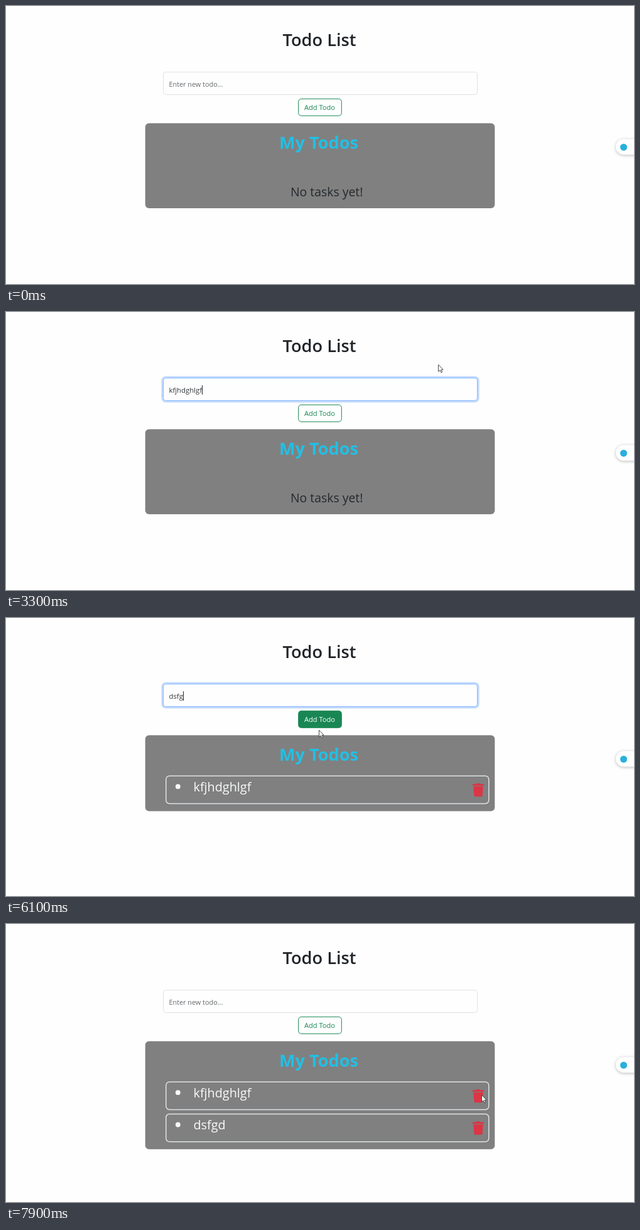
An HTML page with a canvas for the animation above (8 s loop, 1000x444 px).

```html
<!DOCTYPE html>
<html lang="en">
<head>
<meta charset="utf-8">
<title>Todo List</title>
<style>
  html, body { margin: 0; width: 100%; height: 100%; overflow: hidden; background: #fefefe; }
  canvas { display: block; }
</style>
</head>
<body>
<canvas id="stage" width="1000" height="444"></canvas>
<script>
const ctx = document.getElementById('stage').getContext('2d');
const LOOP = 8000, STEP = 100;
const INK = [33, 37, 41], GREEN = [25, 135, 84], WHITE = [254, 254, 254];
const BORDER = [222, 226, 230], FOCUS_BORDER = [134, 183, 254];

const TODOS = [
  { text: 'kfjhdghlgf', added: 4400 },
  { text: 'dsfgd', added: 6500 },
];
// [time, value typed so far]
const TYPING = [
  [0, ''], [2700, 'kf'], [2800, 'kfjh'], [2900, 'kfjhdg'], [3000, 'kfjhdghl'],
  [3100, 'kfjhdghlg'], [3300, 'kfjhdghlgf'], [4400, ''], [5500, 'd'], [5600, 'ds'],
  [5700, 'dsf'], [6000, 'dsfg'], [6200, 'dsfgd'], [6500, ''],
];
const FOCUS = [[1050, 4250], [5150, 6350]];
const HOVER = [[4130, 4680], [5910, 6970]];
const CARET = [[1200, 1700], [2200, 4300], [5200, 6400]];
// Pointer strokes: points are [time, x, y]
const STROKES = [
  [[3300, 688, 84], [3800, 682, 88], [4200, 534, 164], [4400, 528, 168], [4600, 528, 168], [5000, 500, 122]],
  [[6000, 500, 168], [6100, 498, 179], [6200, 503, 167], [6900, 506, 167], [7000, 512, 192]],
  [[7700, 740, 266], [7800, 752, 271], [7900, 757, 273], [8000, 757, 273]],
];
const ARROW = new Path2D('M0 0V11.2L2.6 8.8 4.5 12.8 6.2 12 4.4 8.2H7.7Z');
const HAND = new Path2D('M-1.8 1Q0-1 1.8 1V6.2L7 7.6Q8.4 8.2 8 11L6.8 17.5H-.2L-4.6 10.8Q-4.8 8.4-1.8 10.2Z');

const clamp = v => Math.max(0, Math.min(1, v));
const within = (spans, t) => spans.some(([a, b]) => t >= a && t < b);
// Level of a state that fades in and out over 150 ms
const fade = (spans, t) => Math.max(...spans.map(([a, b]) => clamp((t - a) / 150) - clamp((t - b) / 150)));
const mix = (a, b, k) => `rgb(${a.map((v, i) => Math.round(v + (b[i] - v) * k))})`;

function box(x, y, w, h, r, fill, stroke, line = 1) {
  ctx.beginPath();
  ctx.roundRect(x, y, w, h, r);
  if (fill) { ctx.fillStyle = fill; ctx.fill(); }
  if (stroke) { ctx.strokeStyle = stroke; ctx.lineWidth = line; ctx.stroke(); }
}

function label(text, x, y, size, color, weight = 400) {
  ctx.font = `${weight} ${size}px "Open Sans", "Noto Sans", sans-serif`;
  ctx.fillStyle = color;
  ctx.fillText(text, x, y);
  return ctx.measureText(text).width;
}

function dot(x, y, r, color) {
  ctx.fillStyle = color;
  ctx.beginPath();
  ctx.arc(x, y, r, 0, Math.PI * 2);
  ctx.fill();
}

function drawInput(t) {
  const focus = fade(FOCUS, t);
  if (focus > 0) box(249, 104, 503, 39, 5.5, null, `rgba(13,110,253,${0.25 * focus})`, 3.2);
  box(250.5, 105.5, 500, 36, 4, mix(WHITE, WHITE, 0), mix(BORDER, FOCUS_BORDER, focus));
  const value = TYPING.filter(([at]) => at <= t).pop()[1];
  const width = value ? label(value, 259.5, 129, 11.3, mix(INK, WHITE, 0.08)) : 0;
  if (!value) label('Enter new todo...', 259.5, 129, 10.85, '#65696c');
  if (within(CARET, t)) {
    ctx.fillStyle = '#212529';
    ctx.fillRect(Math.round(259.7 + width), 117, 1, 15);
  }
}

function drawButton(t) {
  const hover = fade(HOVER, t);
  box(465.7, 148.3, 68.6, 27, 4.5, mix(WHITE, GREEN, hover), mix(GREEN, GREEN, 0));
  label('Add Todo', 475, 166, 11.1, mix(GREEN, WHITE, hover));
}

function drawTrash(x, y) {
  ctx.fillStyle = '#dc3545';
  ctx.fill(new Path2D(`M${x} ${y + 1.2}h5.6l1-1.2h5l1 1.2h5.4v2.8h-18z`));
  ctx.fill(new Path2D(`M${x + 1.3} ${y + 5}h15.4l-1.1 14.6q-.2 1.7-1.8 1.7h-9.6q-1.6 0-1.8-1.7z`));
}

function drawPanel(t) {
  const items = TODOS.filter(todo => todo.added <= t);
  const bottom = items.length ? 257 + 51.4 * items.length : 323;
  box(221.7, 187.3, 556.6, bottom - 187.3, 6, '#808080');
  label('My Todos', 435, 228, 27.1, '#23bfe4', 700);
  if (!items.length) label('No tasks yet!', 453, 304, 19.4, '#25292d');
  items.forEach((todo, i) => {
    const y = 252.2 + 51.3 * i;
    box(254.8, y, 514, 44.3, 5.5, null, '#dee2e6', 1.5);
    dot(273.8, y + 17, 3.9, '#f8f9fa');
    label(todo.text, 298.5, y + 24.6, 19.8, '#f8f9fa');
    drawTrash(743, y + 11.8);
  });
}

function drawSideTab() {
  ctx.save();
  ctx.shadowColor = 'rgba(0,0,0,.28)';
  ctx.shadowBlur = 5;
  ctx.shadowOffsetY = 1;
  box(971, 212.5, 50, 25, 12.5, '#fff');
  ctx.restore();
  dot(983.5, 225.5, 5.5, '#27b0dc');
}

function pointerAt(t) {
  const stroke = STROKES.find(s => t >= s[0][0] && t <= s[s.length - 1][0]);
  if (!stroke) return null;
  const next = Math.max(1, stroke.findIndex(p => p[0] >= t));
  const [t0, x0, y0] = stroke[next - 1], [t1, x1, y1] = stroke[next];
  const k = (t - t0) / (t1 - t0);
  // The pointer rests until shortly before it sets off
  const moved = t1 - t0 === 500 && t < t1 ? 0 : k;
  return [x0 + (x1 - x0) * moved, y0 + (y1 - y0) * moved];
}

function drawPointer(t) {
  const point = pointerAt(t);
  if (!point) return;
  const [x, y] = point;
  const overInput = x > 250 && x < 750 && y > 105 && y < 142;
  const overText = x > 222 && x < 738 && y > 187;
  if (overInput || overText) return;
  const overButton = x > 465 && x < 535 && y > 148 && y < 176;
  const shape = overButton ? HAND : ARROW;
  ctx.save();
  ctx.translate(x + 0.5, y);
  ctx.lineWidth = 0.9;
  ctx.lineJoin = 'round';
  ctx.fillStyle = '#fff';
  ctx.strokeStyle = '#3c3c3c';
  ctx.fill(shape);
  ctx.stroke(shape);
  if (overButton) ctx.stroke(new Path2D('M1.8 6.2V9.5M4 7V9.8M6 7.5V10'));
  ctx.restore();
}

function draw(now) {
  const t = Math.floor((now % LOOP) / STEP) * STEP;
  ctx.fillStyle = '#fefefe';
  ctx.fillRect(0, 0, 1000, 444);
  label('Todo List', 440.5, 64, 27.2, '#212529', 600);
  drawInput(t);
  drawButton(t);
  drawPanel(t);
  drawSideTab();
  drawPointer(t);
  requestAnimationFrame(draw);
}
requestAnimationFrame(draw);
</script>
</body>
</html>
```
